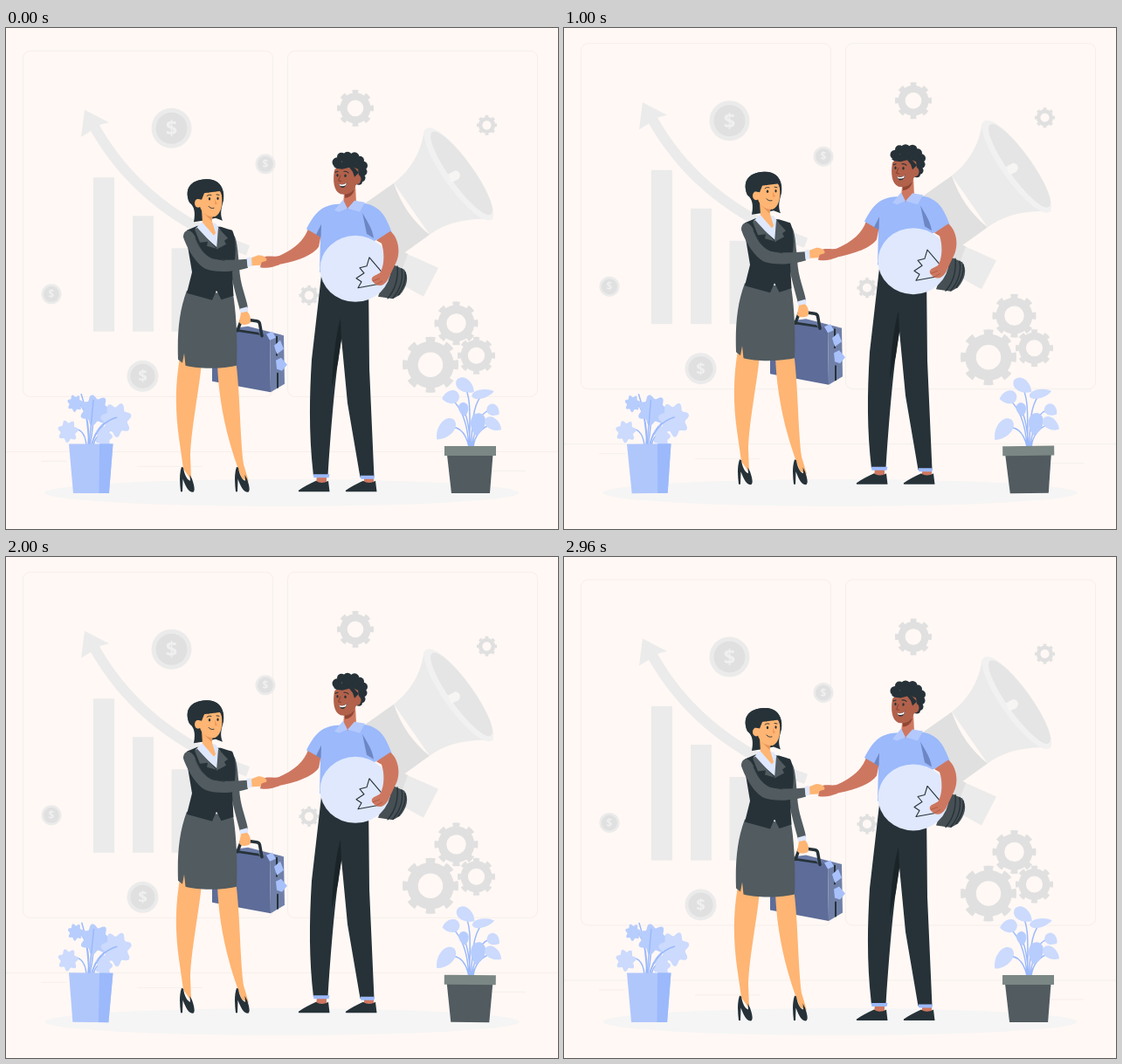
These frames come from a looping animation (632x574 px, 3 s). An HTML page:

```html
<!DOCTYPE html>
<html lang="en">
<head>
<meta charset="utf-8">
<title>Partnership handshake</title>
<style>
html, body { margin: 0; width: 100%; height: 100%; overflow: hidden; background: #fff8f5; }
svg { display: block; width: 100vw; height: 100vh; }
.line { fill: none; stroke: #f5efec; }
.pale { fill: #ebebeb; }
.mid { fill: #e0e0e0; }
.ink { fill: #263238; }
.grey { fill: #515b60; }
.peach { fill: #ffb573; }
.brown { fill: #ce7760; }
.face { fill: #b2614b; }
.sky { fill: #9bb9fb; }
.ice { fill: #dfe8fd; }
.leaf { fill: #cbdafd; }
.leaf.deep { fill: #b7cdfd; }
.stem { fill: none; stroke: #9bb9fb; stroke-width: 1.5; }
.pen { fill: none; stroke: #263238; stroke-linecap: round; stroke-linejoin: round; }
.gear { fill: none; stroke: #e0e0e0; }
text { font-family: "Open Sans", Lato, sans-serif; font-weight: 700; fill: #f0f0f0; text-anchor: middle; }
</style>
</head>
<body>
<svg viewBox="0 0 632 574">
  <ellipse cx="316" cy="532.5" rx="271.5" ry="15.5" fill="#f5f5f5"/>

  <g id="scene">
    <!-- room -->
    <g class="line">
      <rect x="19.5" y="26.5" width="286" height="396" rx="8"/>
      <rect x="322.5" y="26.5" width="286" height="396" rx="8"/>
      <path d="M0 485.5H632M40 496.5H70M150 502.5H225M530 507.5H595"/>
    </g>

    <!-- growth chart -->
    <g class="pale">
      <path d="M100 171.5h24v176.500h-24zM145 215.500h24V348h-24zM189.500 252.500h24V348h-24z"/>
      <path d="M90 94L118 108.500L108 111L96 119L86 125Z"/>
      <path d="M101 113C130 165 180 220 277 255" fill="none" stroke="#ebebeb" stroke-width="12"/>
    </g>
    <g id="coins"></g>
    <g id="gears"></g>

    <!-- megaphone -->
    <path class="pale" d="M430 246L495 275L478 308L440 287Z"/>
    <path class="mid" d="M430 246L460 259L452 281L434 280Z"/>
    <path class="pale" d="M444 178C464 162 475 143 479 117L558 219C529 218 505 222 485 237Z"/>
    <path class="mid" d="M400 209L444 178C452 202 466 222 485 237L446 265Z"/>
    <g transform="translate(518.500 167.500) rotate(54.500)">
      <ellipse rx="64" ry="17" fill="#f1f1f1"/>
      <ellipse cx="1" cy="-3" rx="58" ry="13.500" fill="#e5e5e5"/>
    </g>
    <path d="M506 168L514 163.500C520 164 522 170 517 174L510 177Z" fill="#f7f5f4"/>

    <!-- briefcase -->
    <path d="M236 345H263L302 351L303 417.500L236 405Z" fill="#5d6c98"/>
    <path d="M302 351L318 352.500L319 408L303 417.500Z" fill="#7080a8"/>
    <path d="M255 345L277 342L318 352.500L302 352Z" fill="#6a7aa5"/>
    <path d="M266 345.500L289 349L291 352L264 348Z" class="ink"/>
    <path d="M265 347L269 336Q270 333.500 273 334L287 336Q290 336.500 290.500 339L293 353" class="pen" stroke-width="3.500"/>
    <path d="M310 354V375M311 396V412" class="pen" stroke-width="2"/>
    <path d="M298 351L305 348L309 355L302 358ZM307 364L314 358L318 368L310 374ZM309 381L315 378L322 386L316 393L310 391Z" fill="#a8c1fb"/>

    <!-- her legs -->
    <g class="peach">
      <path d="M200 372C193 410 194 440 198 470L203 505L212 518L211 490C212 460 221 415 224 384Z"/>
      <path d="M242 384C243 420 250 460 264 500L270 516L278 520L272 500C268 470 268 420 263.500 384Z"/>
    </g>
    <path id="shoe" class="ink" d="M201 503C198 512 199 522 200 531.500H202L202.500 517C206 526 209 532 214 532C217 531 215.500 524 213 517L210.500 512L211 519C207 518 204 511 203 504Z"/>
    <use href="#shoe" x="63"/>

    <!-- her clothes -->
    <path class="grey" d="M257 236C264 234 265 250 267 274C268 295 275 308 277 321L268 324C263 305 257 285 256 265Z"/>
    <path class="ice" d="M267.500 322L276.500 319.500L277.500 325L268 327Z"/>
    <path class="peach" d="M269 326.500L276 325C279 328 281 333 279.500 338C276 341 268 341 267 337Z"/>
    <path class="grey" d="M207 301L260 305C264 330 265 360 264 387C245 391 220 391 205.500 387L204 373L202 384L197 380C196 350 198 325 207 301Z"/>
    <path class="ink" d="M207 232L219 227L246 228L259 232C263 240 265 258 259 280L260.500 307L246.500 311.500L241 301L236 312L207 304L213 280L208 250Z"/>
    <path class="ice" d="M217 230L225 222L240 224L246 233L242 252Z"/>
    <path class="grey" d="M216 231L219 229L241 253L230 250L231 245L222 246ZM243 229L254 241L250 244L252 248L241 254Z"/>
    <path class="grey" d="M203 240C203 230 212 229 217 240C222 252 226 259 236 264C248 267 262 266 276 265L277 275C262 280 240 281 228 276C217 270 207 252 203 240Z"/>
    <path class="pen" d="M217 241C222 253 227 260 236 264L250 266.500" stroke-width=".8"/>

    <!-- her head -->
    <path class="ink" d="M215 222.500C217 212 216 205 210 200C204 186 210 174 229 173.500C245 173 251 185 249 198C246 208 245 214 248 221L240 218L225 221Z"/>
    <path class="peach" d="M224 208L236 212V222L240 235L238 238L225 223Z"/>
    <path d="M226 212L237 216L235 221Z" fill="#e5965a"/>
    <path class="peach" d="M222 190L246 187C249 200 247 213 239 216.500C229 217 224 211 222 205Z"/>
    <ellipse class="peach" cx="220" cy="201" rx="4" ry="5"/>
    <path class="ink" d="M210 200C204 186 210 174 229 173.500C245 173 250 184 249 197L246 189L242 183L240 188L236 183L232 189L228 187L224 197L216 195L212 202Z"/>
    <g class="ink">
      <ellipse cx="233" cy="196" rx="1.200" ry="1.800"/>
      <ellipse cx="242.500" cy="195.500" rx="1.100" ry="1.700"/>
    </g>
    <path class="pen" d="M230 192.500Q232 190.500 235 191.500M241 191L244 191.500M232 204.500Q234 207.500 238 206.500" stroke-width=".9"/>
    <path d="M239 196L242 202L239 202.500" fill="#f29b5c"/>

    <!-- his legs -->
    <g class="brown">
      <path d="M356 513H367V523H355ZM410 514H421V523H410Z"/>
    </g>
    <path id="boot" class="ink" d="M335 530C340 526 347 523 355 519C359 522 364 522 369 519L370.500 531.500H337Q334 531.500 335 530Z"/>
    <use href="#boot" x="54"/>
    <path class="ink" d="M361 284L415 290L416 390L421.500 515H405.500L391 430L384 356C379 385 374 430 368.500 513H352C347 470 347 430 350 380Z"/>
    <path d="M383 333L384 357L380 384L373 412C374 380 378 350 383 333Z" fill="#1a2428"/>
    <path class="sky" d="M351.500 511.500H370.500L369.500 515.500H352.500ZM405.500 513H422L421.500 517H406.500Z"/>

    <!-- his body -->
    <path class="brown" d="M346 230C342 243 330 254 311 262L309 272C330 268 350 262 358 251L361 236Z"/>
    <path class="sky" d="M380 202C361 203 353 213 344 230.500L360 239.500L359 280L414 290L418 246L442 235C435 217 429 203 408 201Z"/>
    <path d="M361 225L360.500 240L355 237ZM408 212C412 220 419 228 421 241L413 236Z" fill="#6d87c4"/>
    <path class="brown" d="M387 190L400 180L401 201L391 208L386 203Z"/>
    <path d="M388 190L399 185Q397 194 388 195Z" fill="#8f4635"/>
    <path d="M376 209L386 197L391 207L399 198L411 200L405 211L391 207L381 211Z" fill="#b3c9fd"/>

    <!-- his head -->
    <g id="curls" class="ink"></g>
    <path class="face" d="M376 163C374 175 375 187 383 190.500C391 192 398 189 400 181L405 176L403 162L394 158L379 160Z"/>
    <ellipse class="face" cx="402" cy="173.500" rx="4.500" ry="5.500"/>
    <path class="ink" d="M375 159L386 154L396 157L404 166L399 171L397 165L393 160L385 162L378 161Z"/>
    <g class="ink">
      <ellipse cx="379.500" cy="169" rx="1.100" ry="1.700"/>
      <ellipse cx="388.500" cy="169.500" rx="1.200" ry="1.800"/>
      <path d="M380.500 179Q386 181 390.500 177Q389 184 384 183Z"/>
    </g>
    <path d="M381 179Q386 181 390 177.500L389 180.500Q385 182 382.500 181Z" fill="#fff"/>
    <path class="pen" d="M377 165.500L380 164.500M387 164.500Q390 164 392 166" stroke-width="1.100"/>
    <path d="M383 169L380.500 175L384 176" fill="none" stroke="#84402f"/>

    <!-- light bulb -->
    <path d="M440 270L456 277C462 285 459 297 451 306L443 310.500L426 308Z" fill="#454f54"/>
    <path class="pen" d="M448 273Q450 295 437 310M453 276Q456 294 443 309.500M457 280Q459 292 449 306" stroke-width="1.300"/>
    <ellipse class="ice" cx="400" cy="276" rx="40.500" ry="38"/>
    <path class="pen" d="M433 283L416 263L413 273L405 275L410 281L401 287L407 291L403 298L430 293" stroke-width="1.100"/>
    <path class="brown" d="M424 243.500L440 233C449 240 452 256 447 268L437 289C432 297 425 297 420 291C416 286 422 284 428 281C434 272 433 255 430 247Z"/>
    <path d="M420 290L428 287M424 294L431 290" fill="none" stroke="#a9573f" stroke-width=".8"/>

    <!-- handshake -->
    <path class="brown" d="M313 261.500C305 263 298 260 293 264L291 274.500C300 276 306 274 313 271.500Z"/>
    <path class="ice" d="M275.500 263.500L280.500 262.500L282 273L276.500 274Z"/>
    <path class="peach" d="M281 263.500L289 260.500C295 260.500 300 264 298 267L293 268.500L291 272L281.500 272.500Z"/>
  </g>

  <g id="monstera">
    <path class="stem" d="M94 478C96 455 92 432 79 428M96 478Q101 455 100 430M98 478Q104 452 126 446M92 478Q90 456 72 459M100 478Q103 465 113 465M95 478Q93 440 86 419"/>
    <g id="lobed"></g>
    <path class="stem" d="M95 477Q98 450 100 426M98 477Q106 452 127 446"/>
    <path d="M72 476.500H122.500L118 533H77Z" fill="#b0c7fc"/>
    <path d="M107 476.500H122.500L118 533H106.500Z" class="sky"/>
  </g>

  <g id="pothos">
    <path class="stem" d="M531 480C530 450 534 425 524 408M530 480Q528 440 509 424M533 480C533 445 537 425 548 418M534 480Q538 438 558 437M530 480Q524 452 503 459M535 480Q537 460 558 453M532 480Q530 450 524 437"/>
    <g id="smooth"></g>
    <path class="grey" d="M505 489H557.500L554 533H510Z"/>
    <path d="M502 479H561V490H502Z" fill="#7b8784"/>
  </g>
</svg>

<script>
const $ = id => document.getElementById(id);
const fill = (id, rows, draw) => $(id).innerHTML = rows.map(row => draw(...row)).join('');

fill('coins', [[189.5, 115, 23], [297, 156, 11.5], [52, 305, 11.5], [156.5, 399, 18]], (x, y, r) =>
  `<circle class="pale" cx="${x}" cy="${y}" r="${r}"/><circle class="mid" cx="${x}" cy="${y}" r="${r * .78}"/>
   <text x="${x}" y="${y + r * .37}" font-size="${r * 1.03}">$</text>`);

// ring plus a dashed circle for the teeth
fill('gears', [[400, 92, 21], [550.5, 111.5, 11.5], [347, 306.5, 11.5], [515.5, 338.5, 25], [486, 386, 32], [538.5, 375.5, 21.5]], (x, y, r) =>
  `<g class="gear" transform="translate(${x} ${y})"><circle r="${r * .64}" stroke-width="${r * .39}"/>
   <circle r="${r * .9}" stroke-width="${r * .2}" pathLength="8" stroke-dasharray=".46 .54" stroke-dashoffset=".23"/></g>`);

fill('curls', [[379, 154, 5.5], [384, 148, 5], [391, 147.5, 5.5], [399, 148, 5.5], [405, 152, 5], [409, 158, 5], [409, 165, 4.5],
  [407, 172, 4.5], [404, 176, 4], [393, 155, 9], [401, 162, 9]], (x, y, r) => `<circle cx="${x}" cy="${y}" r="${r}"/>`);

fill('lobed', [[102, 438, 18, 18, 0, 'deep'], [79, 430, 9, 10, 1, 'deep'], [126, 449, 18, 20, 2, ''], [71, 462, 12, 13, 1, ''], [112, 468, 10, 14, 0, '']],
  (x, y, rx, ry, turn, tone) => {
    const pts = Array.from({length: 70}, (_, i) => {
      const a = i / 70 * 2 * Math.PI, k = .86 + .14 * Math.cos(7 * a + turn);
      return [x + rx * k * Math.cos(a), y + ry * k * Math.sin(a)].map(v => v.toFixed(1));
    });
    return `<polygon class="leaf ${tone}" points="${pts.join(' ')}"/>`;
  });

fill('smooth', [[526, 410, 12, 8, 35, ''], [509, 423, 10, 8, 170, ''], [546, 419, 13, 5.5, -12, ''], [524, 437, 8, 6, 80, 'deep'],
  [558, 438, 8, 7, 35, ''], [503, 460, 15, 9, 130, ''], [540, 454, 13, 9, 100, 'deep'], [558, 454, 11, 7, 35, '']], (x, y, w, h, turn, tone) =>
  `<path class="leaf ${tone}" transform="translate(${x} ${y}) rotate(${turn}) scale(${w} ${h})"
   d="M-1 0C-.9 -1.3 .4 -1.2 1 0C.4 1.2 -.9 1.3 -1 0"/>`);

// triangle wave: 0 at whole periods, 1 halfway
const wave = p => 1 - Math.abs(1 - 2 * (p - Math.floor(p)));

const start = performance.now();
function tick() {
  const p = (performance.now() - start + 10) / 1500;
  const sway = 2 * wave(p + .25) - 1;
  $('scene').setAttribute('transform', `translate(0 ${-13.5 * wave(p)})`);
  $('monstera').setAttribute('transform', `rotate(${sway} 101 475)`);
  $('pothos').setAttribute('transform', `rotate(${sway} 530 467)`);
  requestAnimationFrame(tick);
}
tick();
</script>
</body>
</html>
```
